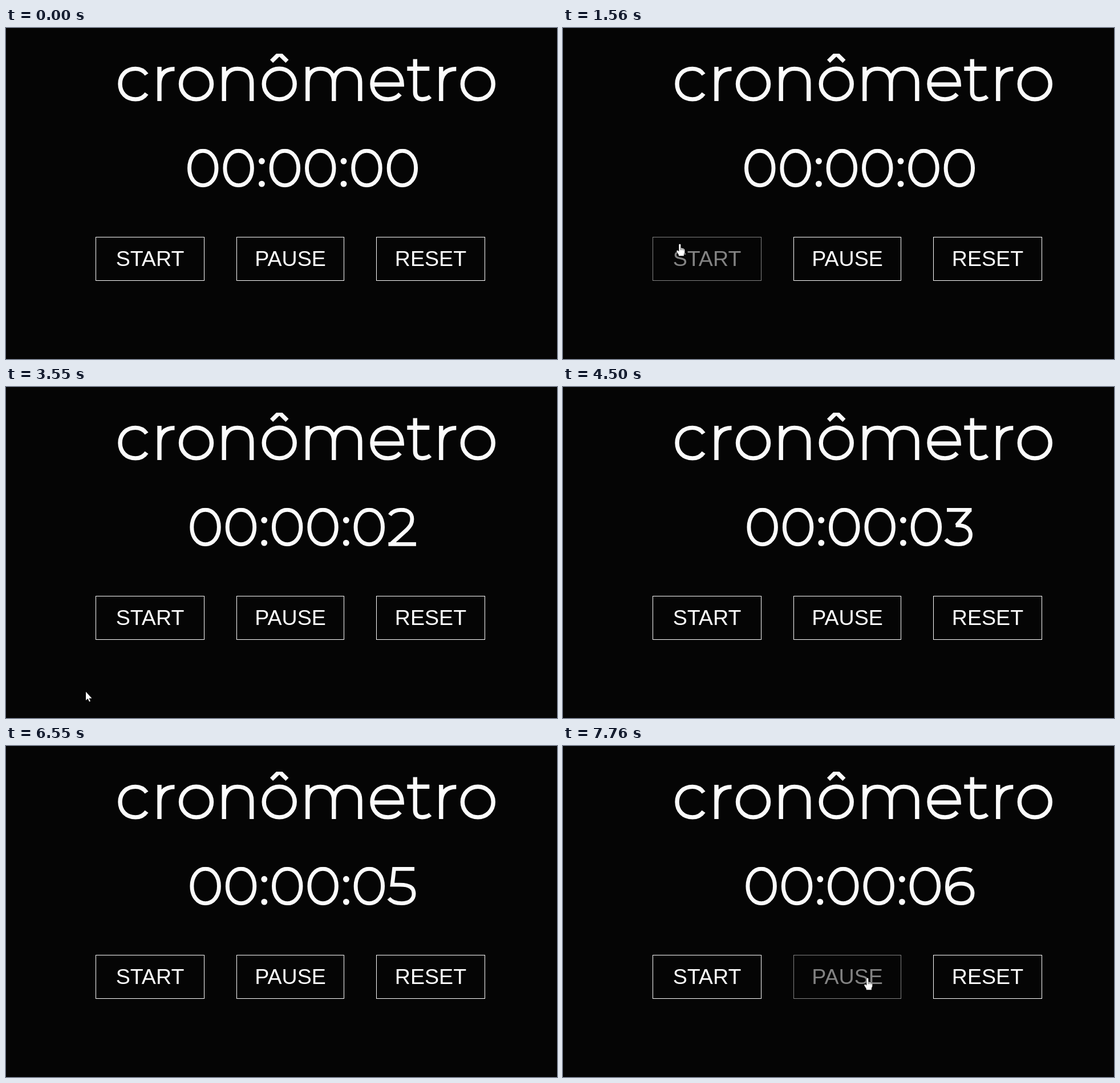
These frames come from a looping animation (966 by 580 pixels, 8 s). An HTML page:

```html
<!DOCTYPE html>
<html lang="pt">
<head>
<meta charset="utf-8">
<title>cronômetro</title>
<style>
html, body { margin: 0; width: 100%; height: 100%; overflow: hidden; background: #050505; }
body > svg { display: block; width: 966px; height: 580px; }
.line { fill: none; stroke: #fbfbfb; stroke-miterlimit: 2; }
.button rect { fill: none; stroke: #fff; }
.button text { font: 37.6px "Liberation Sans", Arial, sans-serif; fill: #fff; text-anchor: middle; }
.pointer { fill: #fff; stroke: #000; paint-order: stroke; }
</style>
</head>
<body>
<svg viewBox="0 0 966 580">
  <svg y="45" width="966" height="85"><g id="title" class="line" role="img" stroke-width="7.4" transform="translate(196 83)"></g></svg>
  <svg y="211.7" width="966" height="67.5"><g id="clock" class="line" role="img" stroke-width="6.9"></g></svg>
  <g id="buttons"></g>
  <circle id="press" r="14" fill="#ff0" fill-opacity=".47"/>
  <g id="cursor">
    <path id="arrow" class="pointer" d="M0 0V15L3.5 12 6 17.5 8 16.5 5.5 11.5H10.5Z"/>
    <g id="hand" transform="translate(.8 .3)">
      <path class="pointer" d="M-1 1Q.5-.5 2 1V7L5.5 7.6 8 8.8 9 10.5V15L7.5 18V21H-1.5V19L-5 13.5Q-5.5 11-3 11.5L-1 13.5Z"/>
      <path d="M2 7V11M4.5 7.5V11M7 8.5V11.5" stroke="#000" stroke-width=".7"/>
    </g>
  </g>
</svg>
<script>
const $ = id => document.getElementById(id);
const SVG = 'http://www.w3.org/2000/svg';

const oval = (x, y, rx, ry, k) =>
  `M${x - rx} ${y}c0 ${-ry * k} ${rx * (1 - k)} ${-ry} ${rx} ${-ry}s${rx} ${ry * (1 - k)} ${rx} ${ry}` +
  `s${-rx * (1 - k)} ${ry} ${-rx} ${ry}s${-rx} ${-ry * (1 - k)} ${-rx} ${-ry}z`;
const dot = y => oval(5.6, y, 2, 2, .55) + `M4 ${y}h3.2`;
const ring = oval(31, -29.9, 27, 26.8, .56);

// Each glyph: advance and centre line, from the left edge on the baseline.
const glyphs = {
  c: [69, 'M50.5-46.5C46-53 39-56.6 31-56.6C15-56.6 4-45.5 4-29.9C4-14 15-3.1 31-3.1C39-3.1 46-6.7 50.5-13.2'],
  r: [37.5, 'M4-60V0M4-29C4-47 13-56.3 30.5-56.3'],
  o: [75.7, ring],
  'ô': [76.6, ring + 'M17.3-69.7L31-83 44.7-69.7'],
  n: [70, 'M4-60V0M4-31C4-46 13-56.6 27.5-56.6C43-56.6 52.5-48 52.5-32V0'],
  m: [113.2, 'M4-60V0M4-32C4-47 12-56.6 26.5-56.6C41-56.6 50-48 50-33V0' +
    'M50-32C50-47 58.5-56.6 72.5-56.6C87-56.6 96-48 96-33V0'],
  e: [65.3, 'M4-29H56.2C56-46 45-56.6 30.5-56.6C15-56.6 4-45.5 4-29.9C4-14 15.5-3.1 32-3.1C40.5-3.1 47.5-6 53-12.2'],
  t: [55.5, 'M14-73.5V-16C14-8 18-3.3 26-3.3C32-3.3 37-5 40.5-8M0-56.8H39'],
  0: [62.4, oval(27.25, -33.1, 23.75, 30.3, .58)],
  1: [34.4, 'M-5-63.2H17.6V0'],
  2: [53.8, 'M1-54.2C5-60 12.5-63.3 21-63.3C33-63.3 40-57 40-47C40-40.5 38-36 30.5-28.2L2-2.5M-1.5-3.2H47'],
  3: [53.6, 'M1-63.2H44.4M41.5-63L18-36M16.5-36.2H20C34-36.2 42.5-30 42.5-19.8' +
    'C42.5-9.5 34.5-3 21-3C11-3 3-6.8-1-11.8'],
  4: [62.8, 'M40.2-70.4L2.5-20M-1-19H58M41-38.5V0'],
  5: [53.6, 'M44-63.2H8.5L5.2-35.5H19C36-35.5 43-30 43-19.5C43-9.5 35-3 21.5-3C11.5-3 3.5-6.5-.8-11.8'],
  6: [57.6, 'M46.5-59.5C42.5-62.3 37-63.4 31.5-63.4C14-63.4 3.5-52 3.5-31.5C3.5-13 11.5-3 27.5-3' +
    'C40-3 48-10 48-20.5C48-31 40-37.5 28-37.5C14.5-37.5 6.5-30 6.5-20.5C6.5-11 14-3 27.5-3'],
  ':': [18.8, dot(-45.3) + dot(-5.5)]
};

function write(line, text) {
  let x = 0;
  line.setAttribute('aria-label', text);
  line.innerHTML = [...text].map(ch => {
    const [advance, d] = glyphs[ch];
    const path = `<path transform="translate(${x})" d="${d}"/>`;
    x += advance;
    return path;
  }).join('');
  return x;
}

function showTime(seconds) {
  const width = write($('clock'), '00:00:0' + seconds);
  $('clock').setAttribute('transform', `translate(${524 - width / 2} 66.9)`);
}

const buttons = [['START', 157.5, 190], ['PAUSE', 404.5, 188], ['RESET', 649.5, 190]].map(([label, x, width]) => {
  const g = document.createElementNS(SVG, 'g');
  g.setAttribute('class', 'button');
  g.innerHTML = `<rect x="${x}" y="366.5" width="${width}" height="76"/>` +
    `<text x="${x + width / 2}" y="417">${label}</text>`;
  $('buttons').append(g);
  return { g, x, width };
});

const glide = (x0, y0, x1, y1, u, power) => {
  const rest = (1 - Math.min(u, 1)) ** power;
  return [x1 + (x0 - x1) * rest, y1 + (y0 - y1) * rest];
};
const step = (t, start, length) => Math.floor((t - start) / length);

function pointerAt(t) {
  if (t < 650) return null;
  if (t < 3410) return glide(127, 512, 203.5, 378, step(t, 650, 69) / 10, 2);
  if (t < 3760) return glide(168, 387, 136, 555, step(t, 3410, 70) / 4, 3);
  if (t < 6880) return null;
  return glide(470, 550, 532.5, 406, step(t, 6880, 76) / 8, 2);
}

const ticks = [2550, 3550, 4500, 5490, 6550, 7490];
let shown = -1;

function draw(t) {
  const seconds = ticks.filter(tick => t >= tick).length;
  if (seconds !== shown) showTime(shown = seconds);

  const p = pointerAt(t);
  const over = p && buttons.find(b => p[0] >= b.x && p[0] <= b.x + b.width && p[1] >= 366 && p[1] <= 443);
  for (const b of buttons) b.g.setAttribute('opacity', b === over ? .5 : 1);

  $('cursor').style.display = p ? '' : 'none';
  $('arrow').style.display = over ? 'none' : '';
  $('hand').style.display = over ? '' : 'none';
  const pressed = t >= 1409 && t < 1560 || t >= 7690 && t < 7760;
  $('press').style.display = pressed ? '' : 'none';
  if (p) {
    const place = `translate(${p[0]} ${p[1]})`;
    $('cursor').setAttribute('transform', place);
    $('press').setAttribute('transform', place);
  }
}

write($('title'), 'cronômetro');
const start = performance.now();
function loop() {
  draw((performance.now() - start) % 8000);
  requestAnimationFrame(loop);
}
loop();
</script>
</body>
</html>
```
